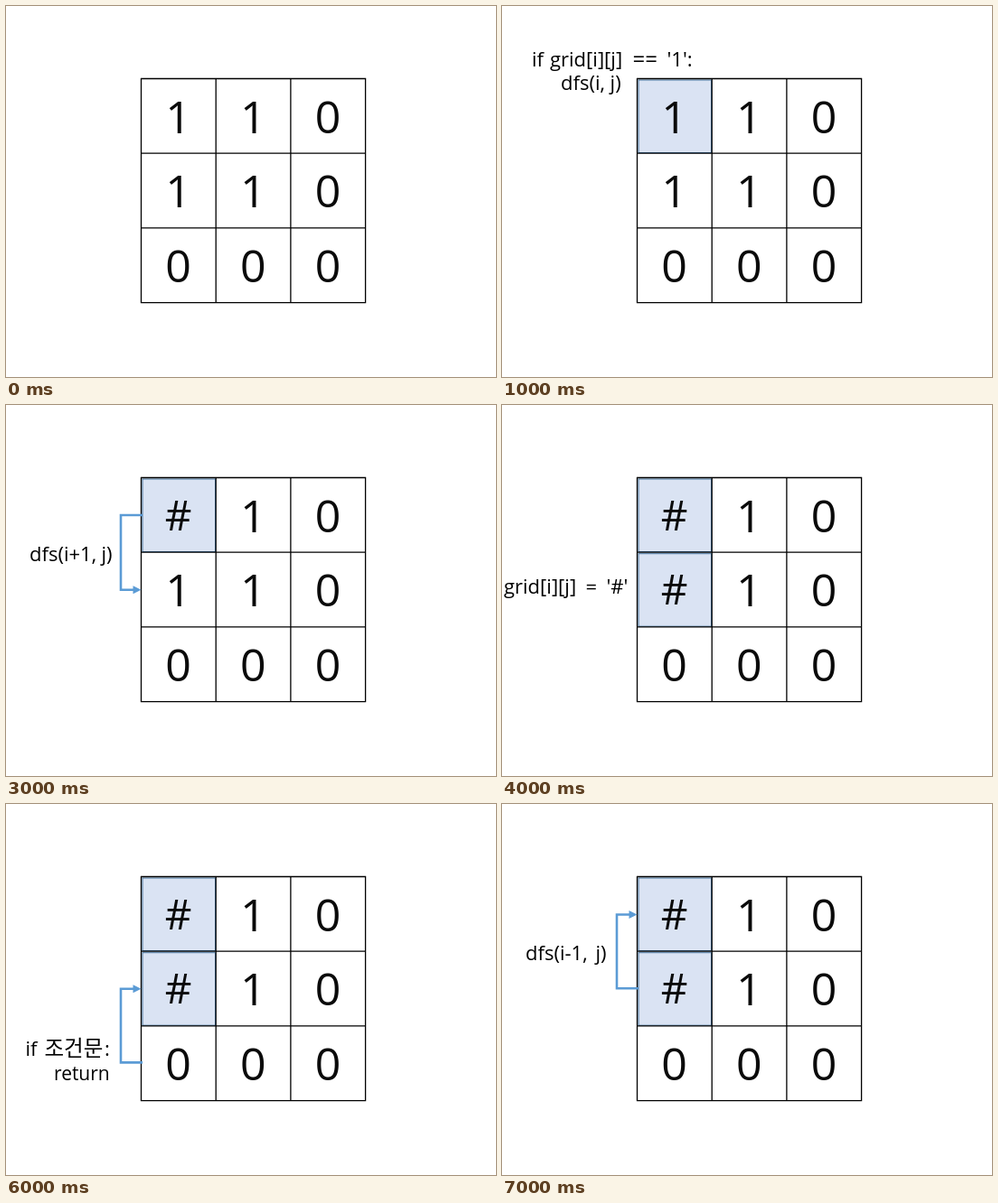
Recreate the animation shown at these times as an HTML page. Size 542 by 411 pixels, loop 8 s.

```html
<!DOCTYPE html>
<html lang="ko">
<head>
<meta charset="utf-8">
<title>Grid DFS</title>
<style>
  html, body { margin: 0; width: 100%; height: 100%; overflow: hidden; background: #fff; }
  svg { display: block; width: 100vw; height: 100vh; }
  text { font-family: "Open Sans", "Noto Sans CJK KR", "Noto Sans CJK", sans-serif; font-size: 22px; fill: #000; }
  .cell { text-anchor: middle; font-size: 50px; }
  .mark { text-anchor: middle; font-size: 46px; }
  .mark, .cell { fill: #0a0a0a; }
</style>
</head>
<body>
<svg id="stage" viewBox="0 0 542 411" xmlns="http://www.w3.org/2000/svg"></svg>
<script>
const STEP = 1000;
const X0 = 149.5, Y0 = 80.5, SIZE = 82.7;
const GRID = ["110", "110", "000"];
const stage = document.getElementById("stage");

const rowMid = r => 122.5 + r * 82.2;

const word = (x, y, s, size = 22) =>
  `<text x="${x}" y="${y}" style="font-size:${size}px">${s}</text>`;

const assign = (x, y) =>
  word(x, y, "grid[i][j]") + word(x + 90.5, y, "=") + word(x + 113.5, y, "'#'");

function arrow(from, to) {
  const a = rowMid(from) - 0.5, b = rowMid(to);
  return `<path d="M151 ${a}H127V${b}H142" fill="none" stroke="#5b9bd5" stroke-width="2.6"/>` +
    `<path d="M149.5 ${b}l-9 -4.5v9z" fill="#5b9bd5"/>`;
}

function shade(r) {
  const y = Y0 + r * SIZE + 1.5;
  return `<rect x="151" y="${y}" width="80.5" height="80.5" fill="#dae3f3" stroke="#41719c"/>`;
}

function lines() {
  let d = "";
  for (let k = 0; k < 4; k++) {
    const p = k * SIZE, end = 3 * SIZE;
    d += `M${X0 + p} ${Y0 - 0.6}v${end + 1.2}M${X0 - 0.6} ${Y0 + p}h${end + 1.2}`;
  }
  return `<path d="${d}" fill="none" stroke="#000" stroke-width="1.3"/>`;
}

function cells(marked) {
  let out = "";
  GRID.forEach((row, r) => [...row].forEach((ch, c) => {
    const hash = c === 0 && r < marked;
    const x = 190.6 + c * SIZE, y = 140.6 + r * SIZE - (hash ? 2 : 0);
    out += `<text class="${hash ? "mark" : "cell"}" x="${x}" y="${y}">${hash ? "#" : ch}</text>`;
  }));
  return out;
}

// Each scene: shaded rows, marked rows, annotations
const scenes = [
  [0, 0, ""],
  [1, 0, word(33, 67, "if") + word(53, 67, "grid[i][j]") + word(144.5, 67, "==", 24) +
         word(182.5, 67, "'1':") + word(65, 93, "dfs(i, j)")],
  [1, 1, assign(121, 55)],
  [1, 1, word(26, 173, "dfs(i+1,") + word(105.5, 173, "j)") + arrow(0, 1)],
  [2, 2, assign(2, 209)],
  [2, 2, word(26, 256, "dfs(i+1,") + word(105.5, 256, "j)") + arrow(1, 2)],
  [2, 2, word(21.5, 279, "if") + word(42.5, 279, "조건문", 23.5) + word(109, 279, ":") +
         word(53, 306, "return", 21) + arrow(2, 1)],
  [2, 2, word(26, 173, "dfs(i-1,") + word(103.5, 173, "j)") + arrow(1, 0)]
];

function render([shaded, marked, notes]) {
  let fills = "";
  for (let r = 0; r < shaded; r++) fills += shade(r);
  stage.innerHTML = fills + lines() + cells(marked) + notes;
}

let shown = -1;
const start = performance.now();
function tick() {
  const t = performance.now() - start;
  const k = Math.floor(t / STEP) % scenes.length;
  if (k !== shown) render(scenes[shown = k]);
  requestAnimationFrame(tick);
}
tick();
</script>
</body>
</html>
```
